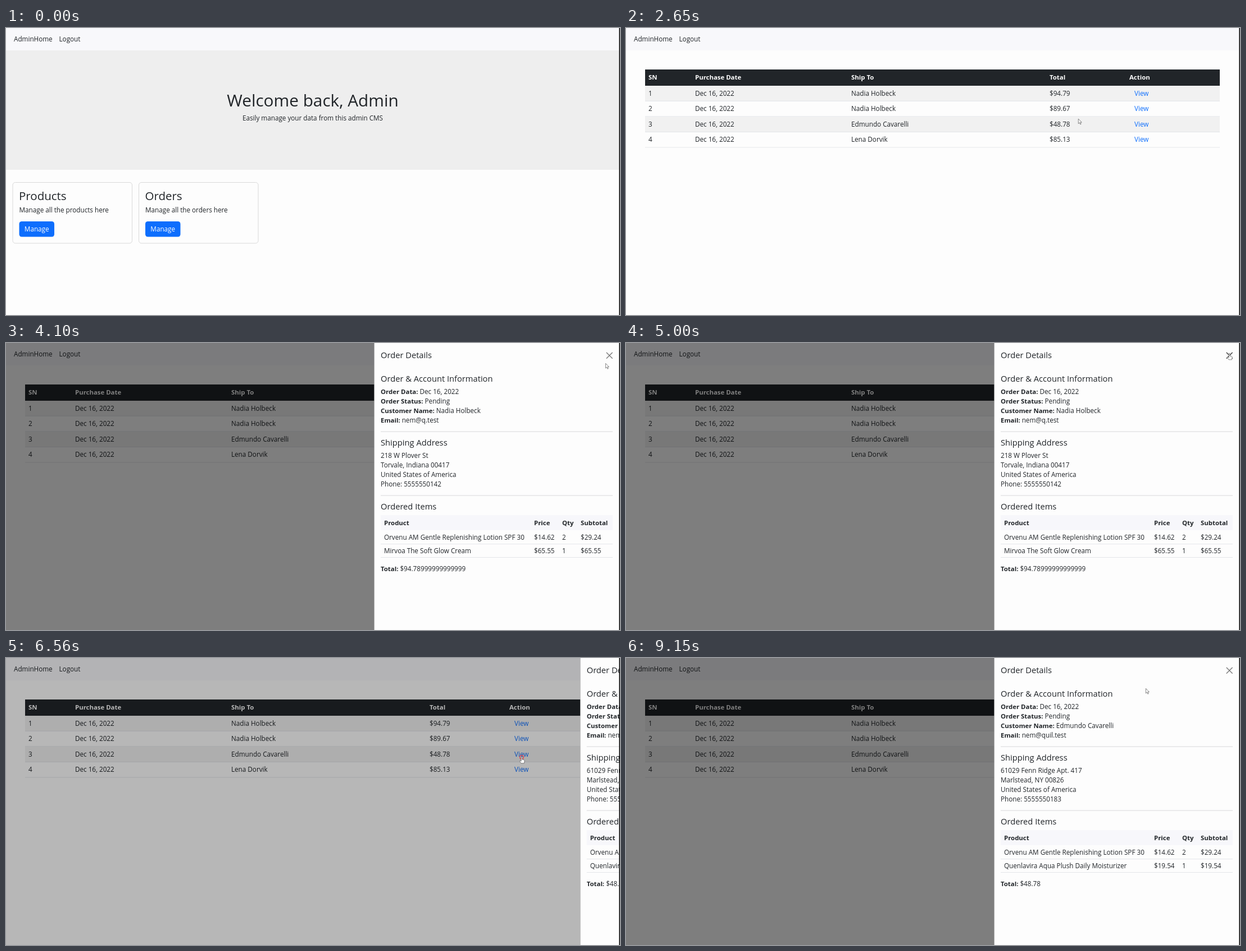
Write an HTML page that moves like this. It is 1093 by 512 pixels and loops after 9860 ms.

```html
<!DOCTYPE html>
<html lang="en">
<head>
<meta charset="utf-8">
<title>Order admin</title>
<style>
  html, body { margin: 0; width: 100%; height: 100%; overflow: hidden; background: #fdfdfd; }
  svg { display: block; width: 1093px; height: 512px; }
  text { font: 11.7px "Open Sans", "Noto Sans", sans-serif; fill: #212529; white-space: pre; }
  .bold { font-size: 11.4px; font-weight: 700; }
  .title { font-size: 29.75px; }
  .card-title { font-size: 20.5px; }
  .heading { font-size: 14.7px; }
  .light { fill: #fff; }
  .link { fill: #0d6efd; }
  .center { text-anchor: middle; }
</style>
</head>
<body>
<svg id="stage" viewBox="0 0 1093 512"></svg>
<script>
const LOOP = 9860;
const PANEL_X = 656, PANEL_W = 436;
const SLIDE = 300, FADE = 150;
const PAGE_SWITCH = 1700;
const OPEN_FIRST = 3129, CLOSE_FIRST = 5089, OPEN_SECOND = 6478;

const stage = document.getElementById("stage");

function add(parent, tag, attrs = {}, content = "") {
  const node = document.createElementNS("http://www.w3.org/2000/svg", tag);
  for (const key in attrs) node.setAttribute(key, attrs[key]);
  node.textContent = content;
  parent.append(node);
  return node;
}
const group = parent => add(parent, "g");
const rect = (parent, x, y, width, height, fill, extra = {}) =>
  add(parent, "rect", { x, y, width, height, fill, ...extra });
const label = (parent, x, y, content, cls = "") =>
  add(parent, "text", { x, y, class: cls }, content);

function field(parent, y, name, value) {
  const line = label(parent, 667, y, "");
  add(line, "tspan", { class: "bold" }, name + ":");
  add(line, "tspan", {}, " " + value);
}

function buildNav(parent) {
  rect(parent, 0, 0, 1092, 40, "#f8f8fb");
  label(parent, 14, 24, "AdminHome");
  label(parent, 94.5, 24, "Logout");
}

function buildCard(parent, x, name) {
  rect(parent, x + 0.5, 275.5, 212.5, 108.5, "#fdfdfd", { rx: 4.5, stroke: "#d9d9d9" });
  label(parent, x + 11.5, 307, name, "card-title");
  label(parent, x + 12, 329, `Manage all the ${name.toLowerCase()} here`);
  const button = rect(parent, x + 12, 345, 62.5, 27.5, "#0d6efd", { rx: 4.5 });
  label(parent, x + 43.2, 363, "Manage", "light center");
  return button;
}

function buildHome() {
  const page = group(stage);
  rect(page, 0, 40, 1092, 213, "#eee");
  label(page, 546, 140, "Welcome back, Admin", "title center");
  label(page, 546, 164.5, "Easily manage your data from this admin CMS", "center");
  buildCard(page, 11.5, "Products");
  return { page, button: buildCard(page, 236, "Orders") };
}

function buildOrders() {
  const page = group(stage);
  const columns = [40, 123, 401, 754, 896];
  rect(page, 34, 74, 1023, 29, "#212529");
  ["SN", "Purchase Date", "Ship To", "Total", "Action"].forEach((name, i) =>
    label(page, columns[i], 92, name, "bold light"));
  const orders = [
    ["Nadia Holbeck", "$94.79"],
    ["Nadia Holbeck", "$89.67"],
    ["Edmundo Cavarelli", "$48.78"],
    ["Lena Dorvik", "$85.13"]
  ];
  orders.forEach(([name, total], i) => {
    const top = 103 + i * 27.6;
    if (i % 2 === 0) rect(page, 34, top, 1023, 27.6, "#f1f1f1");
    rect(page, 34, top + 26.8, 1023, 0.8, "#dee2e6");
    [i + 1, "Dec 16, 2022", name, total].forEach((cell, c) =>
      label(page, columns[c], top + 17.5, cell));
    label(page, 905, top + 17.5, "View", "link");
  });
  return page;
}

function buildDetails(parent, order) {
  const g = group(parent);
  field(g, 91, "Order Data", "Dec 16, 2022");
  field(g, 108, "Order Status", "Pending");
  field(g, 125, "Customer Name", order.name);
  field(g, 142, "Email", order.email);
  order.address.forEach((line, i) => label(g, 667, 205 + i * 17.1, line));
  order.items.forEach((item, row) =>
    item.forEach((cell, c) => label(g, itemColumns[c], 351 + row * 24, cell)));
  field(g, 406.5, "Total", order.total);
  return g;
}

function buildPanel() {
  const panel = group(stage);
  rect(panel, PANEL_X, 0, PANEL_W + 1, 512, "#fdfdfd");
  rect(panel, PANEL_X - 0.7, 0, 0.8, 512, "#c8c8c8");
  label(panel, 667, 27, "Order Details", "heading");
  label(panel, 667, 69, "Order & Account Information", "heading");
  label(panel, 667, 183, "Shipping Address", "heading");
  label(panel, 667, 297, "Ordered Items", "heading");
  rect(panel, 667, 307, 413, 27, "#f7f7fb");
  ["Product", "Price", "Qty", "Subtotal"].forEach((name, i) =>
    label(panel, itemColumns[i], 325, name, "bold"));
  for (const y of [158, 272]) rect(panel, 667, y - 0.4, 413, 0.9, "#d3d4d6");
  for (const y of [358.3, 382]) rect(panel, 667, y, 413, 0.8, "#dee2e6");
  const close = add(panel, "path", {
    d: "M1069.2 17.2l10 10m0-10l-10 10", stroke: "#000", "stroke-width": 1.5, "stroke-linecap": "round"
  });
  return { panel, close };
}

function buildCursor() {
  const cursor = group(stage);
  const style = { fill: "#fff", stroke: "#555", "stroke-width": 0.7, "stroke-linejoin": "round" };
  const arrow = add(cursor, "path", { ...style, d: "M0.4 0.4V9L2.4 7.1L3.8 10.2L5.2 9.6L3.8 6.6H6.4Z" });
  const hand = add(cursor, "path", {
    ...style,
    d: "M-0.9 0.9Q0 -0.4 0.9 0.9V5L4.3 5.8Q5.2 6.2 5 8L4.4 11.8H-1L-3.6 8.2Q-3.6 6.6 -2.2 7.2L-0.9 8.2Z"
  });
  return { cursor, arrow, hand };
}

const itemColumns = [673, 940, 990, 1023];
const lotion = ["Orvenu AM Gentle Replenishing Lotion SPF 30", "$14.62", "2", "$29.24"];

const { page: home, button } = buildHome();
const orders = buildOrders();
buildNav(stage);
const backdrop = rect(stage, 0, 0, 1092, 512, "#000");
const { panel, close } = buildPanel();
const firstOrder = buildDetails(panel, {
  name: "Nadia Holbeck",
  email: "nem@q.test",
  address: ["218 W Plover St", "Torvale, Indiana 00417", "United States of America", "Phone: 5555550142"],
  items: [lotion, ["Mirvoa The Soft Glow Cream", "$65.55", "1", "$65.55"]],
  total: "$94.78999999999999"
});
const secondOrder = buildDetails(panel, {
  name: "Edmundo Cavarelli",
  email: "nem@quil.test",
  address: ["61029 Fenn Ridge Apt. 417", "Marlstead, NY 00826", "United States of America", "Phone: 5555550183"],
  items: [lotion, ["Quenlavira Aqua Plush Daily Moisturizer", "$19.54", "1", "$19.54"]],
  total: "$48.78"
});
rect(stage, 1091.4, 0, 1.6, 512, "#111");
const ring = add(stage, "circle", { fill: "none", stroke: "#e0444c", "stroke-width": 1.3 });
const { cursor, arrow, hand } = buildCursor();

// Pointer stops: time, x, y
const stops = [
  [30, 866, 382], [990, 300, 370], [1300, 276, 361], [2050, 276, 361],
  [2880, 926, 116], [3330, 926, 116], [4100, 1067, 36], [4320, 1074, 18],
  [5110, 1074, 18], [5340, 942, 110], [5740, 930, 150], [6100, 918, 176],
  [6850, 918, 176], [7420, 925, 54]
];
// Clicks: time, x, y
const clicks = [[1560, 276, 362], [OPEN_FIRST, 926, 117], [CLOSE_FIRST, 1074, 18], [OPEN_SECOND, 918, 177]];
const handSpans = [[1080, PAGE_SWITCH], [2800, 3350], [4240, 5130], [6000, 6850]];

const clamp = v => Math.min(1, Math.max(0, v));
const smooth = v => v * v * (3 - 2 * v);
const within = (t, [from, to]) => t >= from && t < to;
const show = (node, on) => node.setAttribute("visibility", on ? "inherit" : "hidden");

// cubic-bezier(.42, 0, .58, 1)
function easeInOut(x) {
  let low = 0, high = 1;
  for (let i = 0; i < 20; i++) {
    const s = (low + high) / 2, r = 1 - s;
    if (1.26 * s * r * r + 1.74 * s * s * r + s ** 3 < x) low = s; else high = s;
  }
  return smooth(low);
}

function openness(t, duration, ease) {
  const phase = start => ease(clamp((t - start) / duration));
  return phase(OPEN_FIRST) - phase(CLOSE_FIRST) + phase(OPEN_SECOND);
}

function pointerAt(t) {
  const next = stops.findIndex(stop => stop[0] > t);
  if (next < 1) return stops[next < 0 ? stops.length - 1 : 0].slice(1);
  const [t0, x0, y0] = stops[next - 1], [t1, x1, y1] = stops[next];
  const k = smooth((t - t0) / (t1 - t0));
  return [x0 + (x1 - x0) * k, y0 + (y1 - y0) * k];
}

function render(t) {
  show(home, t < PAGE_SWITCH);
  show(orders, t >= PAGE_SWITCH);
  const hover = clamp((t - 1080) / 150);
  button.setAttribute("fill", `rgb(${13 - 2 * hover},${110 - 16 * hover},${253 - 38 * hover})`);

  const slide = openness(t, SLIDE, easeInOut);
  show(panel, slide > 0);
  panel.setAttribute("transform", `translate(${(1 - slide) * PANEL_W} 0)`);
  backdrop.setAttribute("opacity", 0.5 * openness(t, FADE, v => v));
  show(firstOrder, t < OPEN_SECOND);
  show(secondOrder, t >= OPEN_SECOND);
  close.setAttribute("opacity", within(t, handSpans[2]) ? 0.75 : 0.5);

  const click = clicks.find(([start]) => within(t, [start, start + 300]));
  show(ring, click);
  if (click) {
    const [start, cx, cy] = click;
    ring.setAttribute("cx", cx);
    ring.setAttribute("cy", cy);
    ring.setAttribute("r", (t - start) * 0.04);
  }

  const pointing = handSpans.some(span => within(t, span));
  show(cursor, t >= 30);
  show(hand, pointing);
  show(arrow, !pointing);
  cursor.setAttribute("transform", `translate(${pointerAt(t).join(" ")})`);
}

function tick() {
  render(performance.now() % LOOP);
  requestAnimationFrame(tick);
}
tick();
</script>
</body>
</html>
```
